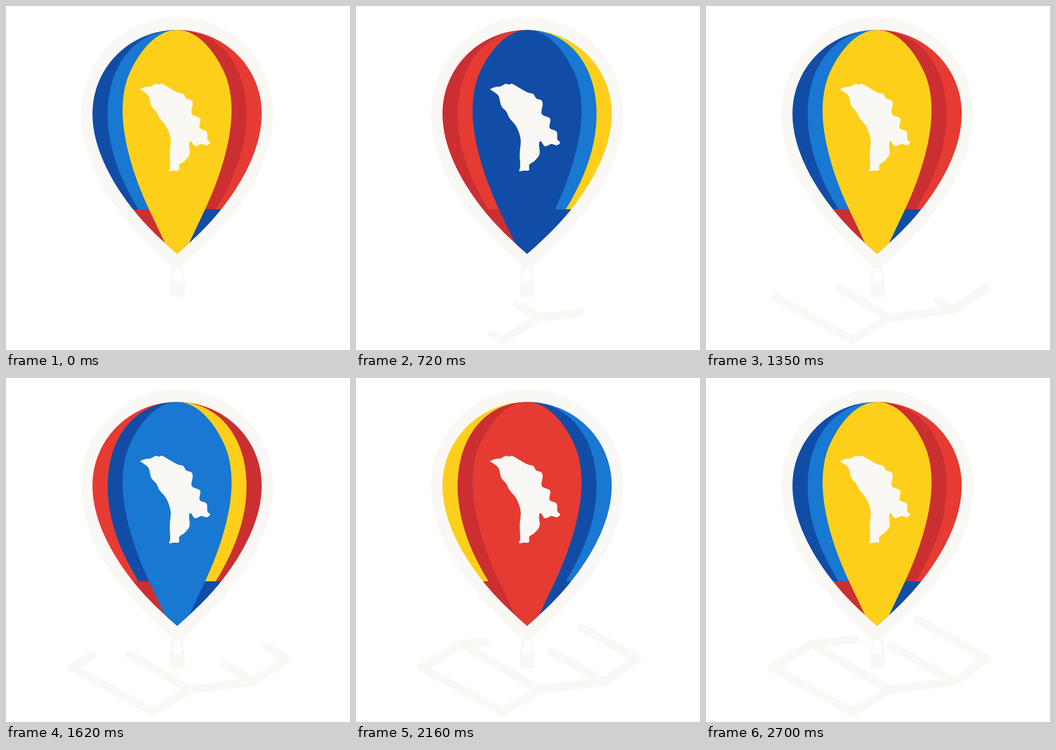
An HTML page for the animation above (2.97 s loop, 748 by 748 pixels).

```html
<!DOCTYPE html>
<html lang="en">
<head>
<meta charset="utf-8">
<title>Balloon pin</title>
<style>
html, body { margin: 0; width: 100%; height: 100%; overflow: hidden; background: #fff; }
svg { display: block; width: 100vw; height: 100vh; }
#roads { fill: none; stroke: #faf8f4; stroke-width: 18; stroke-linecap: round; stroke-linejoin: round; }
</style>
</head>
<body>
<svg viewBox="0 0 748 748">
  <defs>
    <clipPath id="hull">
      <path d="M372 52C270 52 188 133 188 234C188 310 231 385 276 442C303 476 332 504 372 539C412 504 441 476 468 442C513 385 556 310 556 234C556 133 474 52 372 52Z"/>
    </clipPath>
  </defs>
  <g id="roads"></g>
  <g fill="#faf8f4">
    <path d="M372 24C257 24 163 118 163 235C163 320 208 401 256 459C287 496 320 529 361 566L366 571H378L383 566C424 529 457 496 488 459C536 401 581 320 581 235C581 118 487 24 372 24Z"/>
    <path fill-rule="evenodd" d="M361 565H383L389 599V632H356V599ZM367 571L362 597Q372 603 383 597L378 571Z"/>
  </g>
  <g id="bands" clip-path="url(#hull)">
    <path fill="#cb2f32" d="M250 442H372V545H250Z"/>
    <path fill="#114da6" d="M372 442H494V545H372Z"/>
  </g>
  <path id="land" fill="#faf8f4"/>
</svg>
<script>
const LOOP = 2970, STEP = 90, SHIFT = 270, END = 2700;
const COLORS = ['#114da6', '#1878d2', '#fdcf1a', '#cb2f32', '#e63b32'];   // left to right

function addPath(parent, d) {
  const el = document.createElementNS('http://www.w3.org/2000/svg', 'path');
  el.setAttribute('d', d);
  document.getElementById(parent).append(el);
  return el;
}

// Left halves from the outside in; each is mirrored to the right
const bands = [
  'M373 40H180V442H373Z',
  'M373 52H372C284 52 221 126 221 235C221 310 250 380 288 442H373Z',
  'M373 52H372C330 52 293 93 270 143C258 168 253.5 200 253.5 227C253.5 300 284 385 311 442L346 516L360 545H373Z'
].flatMap((d, i) => [i, 4 - i].map((slot, side) => {
  const el = addPath('bands', d);
  if (side) el.setAttribute('transform', 'translate(744) scale(-1 1)');
  return { el, slot };
}));

// Closed Catmull-Rom curve through a few points
function smooth(text) {
  const pts = text.split(',').map(p => p.trim().split(' ').map(Number));
  const at = i => pts[(i + pts.length) % pts.length];
  const curves = pts.map((p, i) => {
    const a = at(i - 1), q = at(i + 1), b = at(i + 2);
    const out = p.map((v, k) => v + (q[k] - a[k]) / 6);
    const into = q.map((v, k) => v - (b[k] - p[k]) / 6);
    return `C${out} ${into} ${q}`;
  });
  return `M${pts[0]}${curves.join('')}Z`;
}
document.getElementById('land').setAttribute('d', smooth(
  `292 181, 304 176, 314 175, 325 169.5, 333 171, 341 170, 371 187, 385 191, 392 201, 403 205,
  406 214, 404 235, 422 245, 421 265, 436 273, 438 290, 444 297, 436 303, 425 300, 411 305,
  402 294, 398 300, 399 322, 388 337, 377 345, 376 357, 365 358, 355 359, 357 349, 356 320,
  358 290, 349 263, 334 244, 327 230, 316 217, 310 196, 299 186`));

// Each road: path, start time, length reached at END
const roads = [
  ['M400 678L318 726L143 629L230 579L324 568', 270, 490],
  ['M400 678L230 579', 240, 215],
  ['M400 678L540 660L612 610L460 526', 330, 403],
  ['M540 660L402 582', 1040, 158]
].map(([d, from, reach]) => ({ el: addPath('roads', d), from, reach }));

const easeOut = u => u * (4 - u ** 3) / 3;

function draw(ms) {
  const t = Math.floor((ms % LOOP) / STEP) * STEP;
  const turn = Math.floor(t / SHIFT) % 5;
  for (const { el, slot } of bands) el.setAttribute('fill', COLORS[(slot - turn + 5) % 5]);
  for (const { el, from, reach } of roads) {
    const u = Math.min(1, (t - from) / (END - from));
    el.style.display = u > 0 && t > SHIFT ? '' : 'none';
    el.setAttribute('stroke-dasharray', `${reach * easeOut(Math.max(0, u))} 2000`);
  }
}

let start;
function tick(now) {
  start ??= now;
  draw(Math.max(0, now - start));
  requestAnimationFrame(tick);
}
draw(0);
requestAnimationFrame(tick);
</script>
</body>
</html>
```
